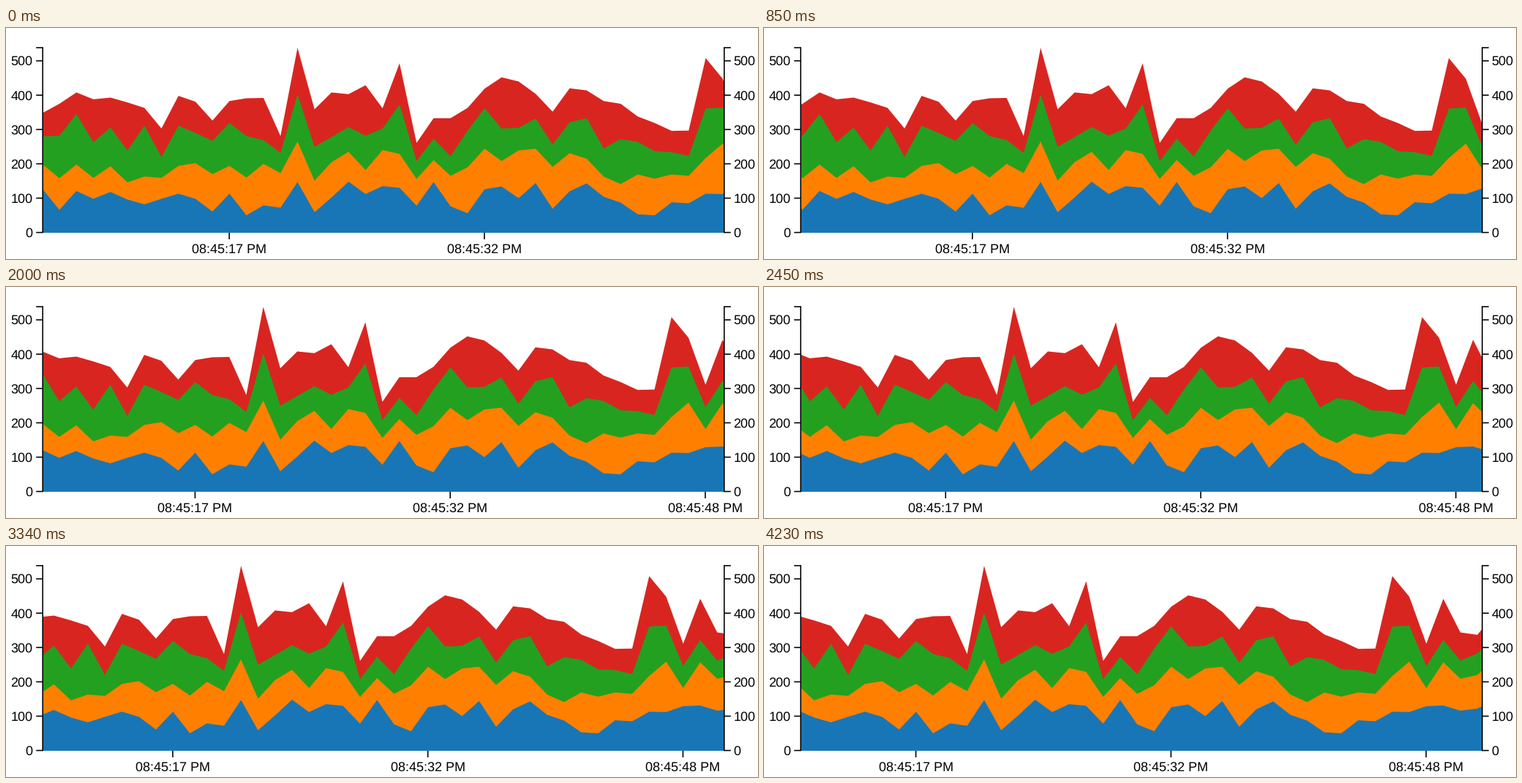
These frames come from a looping animation (1028 by 317 pixels, 4.31 s). A matplotlib script:

```python
import numpy as np
import matplotlib.pyplot as plt
from matplotlib.animation import FuncAnimation
from matplotlib.patches import Polygon, Rectangle
from matplotlib.transforms import Affine2D

W, H, DPI = 1028, 317, 64
PT = 72 / DPI                       # points per pixel
LOOP, STEP = 4310, 10               # ms
LEFT, RIGHT, TOP, BASE = 51, 981, 27, 280.6
GAP = 23.25                         # pixels per second of data
FIRST = 49.75                       # x of the first sample at time zero
SPEED = 2.033                       # pixels scrolled per redraw
LINE = 1.6

plt.rcParams["font.family"] = "Liberation Sans"
plt.rcParams["text.hinting"] = "none"

# Upper edge of each stacked layer, one sample per second
blue = [127, 66, 121, 98, 118, 96, 82, 98, 113, 98, 61, 113, 50, 79, 72, 147,
        59, 102, 148, 112, 135, 130, 78, 147, 76, 56, 126, 134, 100, 144, 69,
        120, 143, 104, 87, 53, 50, 88, 85, 113, 112, 129, 131, 116, 122, 146]
orange = [199, 158, 198, 159, 193, 146, 163, 159, 194, 202, 170, 194, 160,
          200, 173, 265, 151, 205, 235, 182, 240, 229, 156, 211, 165, 190,
          244, 208, 239, 244, 191, 231, 215, 163, 141, 169, 157, 169, 165,
          217, 259, 182, 257, 209, 220, 268]
green = [280, 282, 345, 263, 306, 239, 311, 220, 311, 290, 267, 319, 281, 269,
         232, 402, 250, 278, 307, 282, 303, 373, 208, 273, 222, 297, 362, 303,
         305, 332, 256, 321, 333, 245, 272, 264, 237, 234, 223, 361, 364, 246,
         322, 262, 283, 330]
red = [348, 375, 408, 388, 393, 379, 363, 303, 398, 381, 326, 383, 391, 392,
       281, 538, 359, 408, 403, 429, 362, 493, 261, 333, 333, 363, 419, 452,
       440, 404, 352, 420, 414, 383, 375, 338, 319, 296, 297, 508, 448, 311,
       442, 344, 337, 397]

# Moments at which the chart is redrawn: (first, last, count)
BURSTS = [(60, 580, 7), (670, 1120, 6), (1210, 1650, 6), (1740, 2180, 6),
          (2270, 2720, 6), (2810, 3250, 6), (3340, 3780, 6), (3870, 4230, 5)]
redraws = np.concatenate([[0]] + [np.linspace(*b).round(-1) for b in BURSTS])

fig = plt.figure(figsize=(W / DPI, H / DPI), dpi=DPI, facecolor="white")
ax = fig.add_axes([0, 0, 1, 1])
ax.set_xlim(0, W)
ax.set_ylim(H, 0)
ax.axis("off")


def y_of(value):
    return BASE - 0.471 * value


def stroke(xs, ys):
    line, = ax.plot(xs, ys, color="black", lw=LINE * PT, snap=False,
                    solid_capstyle="butt", solid_joinstyle="miter", zorder=3)
    return line


def label(x, y, text, align):
    return ax.text(x, y, text, ha=align, va="baseline", fontsize=18 * PT,
                   color="black", zorder=3)


def add_layer(tops, color):
    xs = FIRST + GAP * np.arange(len(tops))
    edge = list(zip(xs, y_of(np.array(tops))))
    area = Polygon([(xs[0], 281)] + edge + [(xs[-1], 281)],
                   facecolor=color, edgecolor="none")
    ax.add_patch(area)
    area.set_clip_path(window)
    return area


def add_value_axis(x, side, align):
    tip = x + 9 * side
    stroke([tip, x, x, tip], [TOP, TOP, BASE, BASE])
    for value in range(0, 501, 100):
        y = y_of(value)
        if value:
            stroke([x, tip], [y, y])
        label(x + (14 if side < 0 else 12.5) * side, y + 6.2, str(value), align)


window = Rectangle((LEFT, 0), RIGHT - LEFT, H, transform=ax.transData)
layers = [add_layer(red, "#d92520"), add_layer(green, "#23a020"),
          add_layer(orange, "#ff8000"), add_layer(blue, "#1876b6")]
add_value_axis(50.2, -1, "right")
add_value_axis(981.8, 1, "left")

time_ticks = []
for n, second in enumerate((17, 32, 48)):
    x = 305.2 + n * 15 * GAP
    time_ticks.append((x, stroke([x, x], [281, 290]),
                       label(x, 309, f"08:45:{second} PM", "center")))


def update(frame):
    count = np.searchsorted(redraws, frame * STEP, side="right") - 1
    shift = SPEED * count
    for area in layers:
        area.set_transform(Affine2D().translate(-shift, 0) + ax.transData)
    for x, mark, text in time_ticks:
        mark.set_xdata([x - shift] * 2)
        text.set_x(x - shift)
    # The newest time tick fades in over one second of scrolling
    fade = float(np.clip((shift - 22) / GAP, 0, 1))
    for artist in time_ticks[-1][1:]:
        artist.set_alpha(fade)
    return layers


anim = FuncAnimation(fig, update, frames=LOOP // STEP, interval=STEP,
                     repeat=True, repeat_delay=0, blit=False)
plt.show()
```
